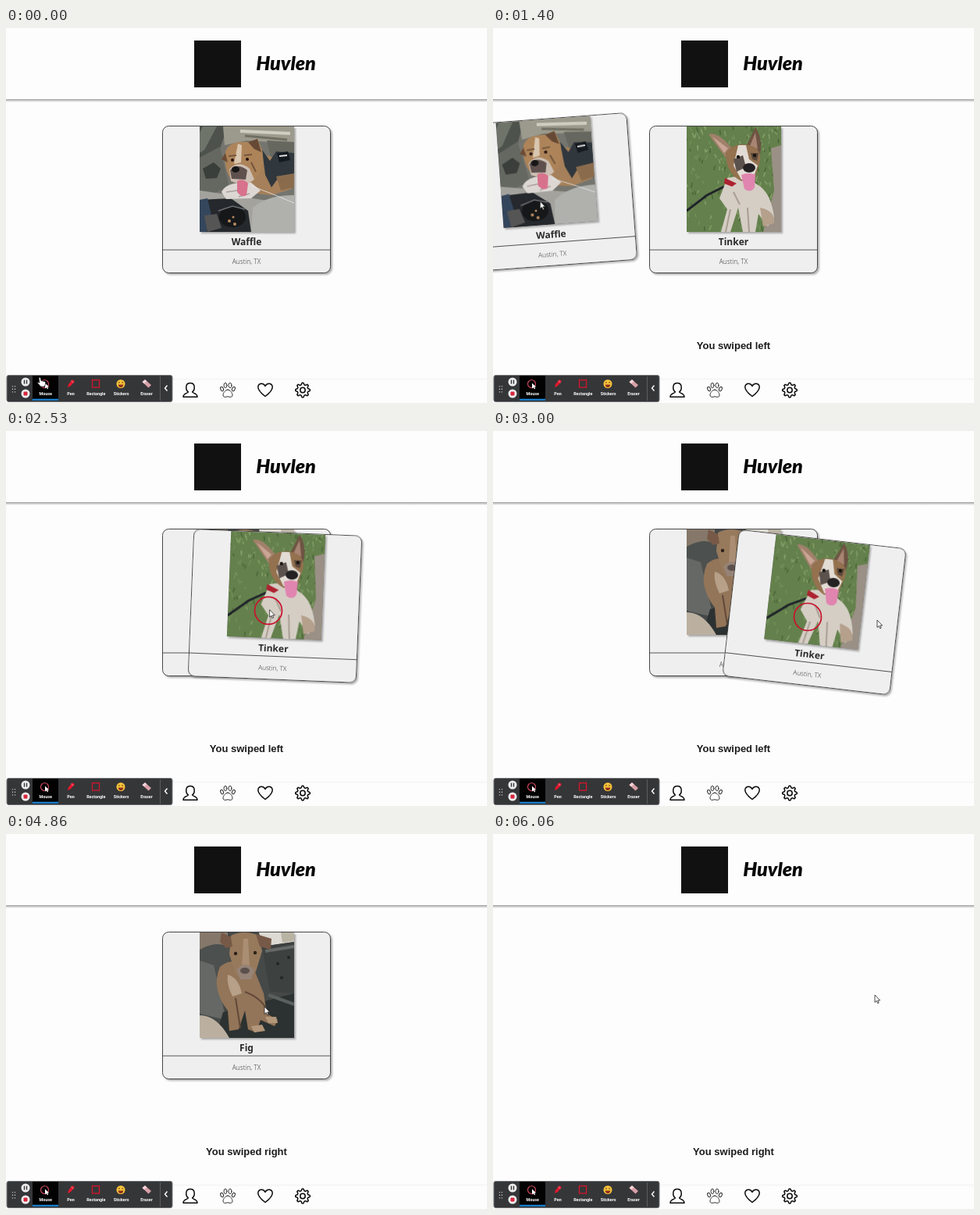
Recreate the animation shown at these times as an HTML page. Size 616x480 px, loop 6.13 s.

```html
<!DOCTYPE html>
<html lang="en">
<head>
<meta charset="utf-8">
<title>Pet cards</title>
<style>
  html, body { margin: 0; width: 100%; height: 100%; overflow: hidden; background: #fdfdfd; }
  svg { display: block; width: 100%; height: 100%; }
  text { text-anchor: middle; }
  .brand { font: italic 900 25px Lato, sans-serif; fill: #080808; }
  .name { font: 600 12px "Noto Sans", "Open Sans", sans-serif; fill: #2a2a2a; }
  .place { font: 300 8.4px "Open Sans", sans-serif; fill: #333; }
  .note { font: bold 13px "Liberation Sans", Arial, sans-serif; fill: #1c1c1c; }
  .tool { font: bold 5.4px Roboto, sans-serif; fill: #fff; }
  .line { fill: none; stroke: #0a0a0a; stroke-width: 1.5; stroke-linejoin: round; stroke-linecap: round; }
  .thin { stroke: #333; stroke-width: 1; }
</style>
</head>
<body>
<svg viewBox="0 0 616 480" preserveAspectRatio="none">
  <defs>
    <filter id="shade" x="-10%" y="-10%" width="125%" height="125%">
      <feDropShadow dx="2" dy="2" stdDeviation="1.2" flood-opacity=".3"/>
    </filter>
    <filter id="soft" x="-10%" y="-10%" width="120%" height="120%">
      <feGaussianBlur stdDeviation=".5"/>
    </filter>
    <linearGradient id="fall" x2="0" y2="1">
      <stop offset="0" stop-color="#a2a2a2"/>
      <stop offset=".4" stop-color="#c4c4c4"/>
      <stop offset="1" stop-color="#fdfdfd"/>
    </linearGradient>
    <clipPath id="frame"><rect width="121" height="135"/></clipPath>

    <g id="photo0">
      <rect width="121" height="135" fill="#75756f"/>
      <path d="M0 0H36L24 34 0 52Z" fill="#4d524c"/>
      <path d="M4 0H22L6 30 0 34V8Z" fill="#6f746b"/>
      <path d="M30 0H121V22L60 18 32 24Z" fill="#9c9a8c"/>
      <path d="M52 6 116 9" stroke="#d0cec2" stroke-width="4"/>
      <path d="M58 12 112 17" stroke="#706f63" stroke-width="3"/>
      <path d="M86 18 121 20V42H92Z" fill="#66675f"/>
      <path d="M0 40 26 26 38 78 0 92Z" fill="#656761"/>
      <path d="M4 54 18 46 27 54 22 66 8 67Z" fill="#3a3f3b"/>
      <path d="M0 82 121 100V135H0Z" fill="#a3a29d"/>
      <path d="M0 94 40 92 62 108 66 135H0Z" fill="#25282c"/>
      <path d="M0 94 10 92 18 126 8 135H0Z" fill="#34465c"/>
      <path d="M6 114 22 112 28 130 10 135Z" fill="#565555"/>
      <ellipse cx="42" cy="116" rx="17" ry="13" fill="#151719"/>
      <path d="M24 108 42 102 58 106" fill="none" stroke="#6b6e70" stroke-width="1.5"/>
      <g fill="#b78b62"><circle cx="38" cy="121" r="2"/><circle cx="45" cy="125" r="2"/><circle cx="43" cy="116" r="1.5"/></g>
      <path d="M68 104Q86 88 121 88V135H66Z" fill="#b0b0ad"/>
      <path d="M70 38Q100 32 114 60L118 80 92 88 58 84Z" fill="#a5805a"/>
      <path d="M28 84Q34 70 66 72L78 82 66 92 34 93Z" fill="#ddd7d4"/>
      <path d="M34 84 48 82M50 90 64 86" stroke="#a99f9a" stroke-width="1.5"/>
      <path d="M80 30 90 44 98 32 121 34V62L102 64 92 78 84 62Z" fill="#30373d"/>
      <path d="M98 64 121 60V78L104 82Z" fill="#8a6c4d"/>
      <path d="M99 34 113 32 116 43 102 46Z" fill="#151a20"/>
      <path d="M102 38 112 37" stroke="#ddd" stroke-width="2"/>
      <path d="M33 32Q38 18 62 20L74 16 80 30Q85 58 66 72H44Q30 58 33 32Z" fill="#ad8459"/>
      <path d="M62 20 74 16 79 33 70 29Z" fill="#664935"/>
      <path d="M33 34 28 42 36 46Z" fill="#6c4b35"/>
      <path d="M49 22 54 24 53 46 44 48Z" fill="#d9c6b0"/>
      <path d="M37 38 47 37M57 37 67 36M66 46 72 58" stroke="#74563d" stroke-width="2"/>
      <path d="M38 55Q49 42 64 54L70 68 58 76 40 70Z" fill="#cdbfb3"/>
      <path d="M39 56Q48 46 61 56L59 68 41 67Z" fill="#5e514d"/>
      <ellipse cx="46" cy="55" rx="5" ry="4" fill="#171717"/>
      <circle cx="42" cy="43" r="2" fill="#211"/><circle cx="61" cy="42" r="2" fill="#211"/>
      <path d="M48 70Q56 66 62 73L60 88Q54 92 48 84Z" fill="#d8718c"/>
      <path d="M66 76 92 86 121 98" fill="none" stroke="#e9e9e9" stroke-width=".8"/>
    </g>

    <g id="photo1">
      <rect width="121" height="135" fill="#64804c"/>
      <g id="grass"/>
      <path d="M108 28 121 24V135H98L112 82Z" fill="#9a9085"/>
      <path d="M0 108 26 88 48 77" fill="none" stroke="#20242a" stroke-width="3"/>
      <path d="M52 66Q74 60 90 74 108 84 112 116L104 128 92 112 88 135H72L66 104 56 135H44L52 106 42 92Z" fill="#d5cec5"/>
      <path d="M94 104Q114 108 112 124L98 128Z" fill="#b5a08c"/>
      <path d="M56 106 50 135M78 104 80 135M60 84 68 100" stroke="#a99e92" stroke-width="2"/>
      <path d="M50 40 28 10Q40 6 58 28Z" fill="#a0806a"/>
      <path d="M48 34 33 13 53 28Z" fill="#caa595"/>
      <path d="M76 26 88 1Q98 16 94 36Z" fill="#6d5443"/>
      <path d="M81 25 88 8 91 29Z" fill="#a88473"/>
      <path d="M50 34Q60 20 80 24 96 28 94 44L88 64 70 70Q50 60 50 34Z" fill="#94714f"/>
      <path d="M66 24 76 24 80 42 91 50 86 64 70 68 60 50Z" fill="#e2dcd4"/>
      <path d="M60 42 72 37 76 52 64 58Z" fill="#5c524d"/>
      <path d="M82 34 92 34 90 44 84 42Z" fill="#5a483a"/>
      <circle cx="66" cy="39" r="2.2" fill="#17130f"/><circle cx="87" cy="37" r="2.2" fill="#17130f"/>
      <ellipse cx="80" cy="53" rx="8" ry="6" fill="#242122"/>
      <path d="M70 62Q80 58 88 62L87 78Q82 86 74 80Z" fill="#e085af"/>
      <path d="M49 66 64 73 58 77 48 73Z" fill="#ad2230"/>
    </g>

    <g id="photo2">
      <rect width="121" height="135" fill="#454948"/>
      <path d="M0 0H36V14L0 24Z" fill="#85786a"/>
      <path d="M76 0H121V12L80 18Z" fill="#dcdad2"/>
      <path d="M104 0H121V11L106 13Z" fill="#b9b3a4"/>
      <path d="M0 22Q26 8 40 22L34 92 0 100Z" fill="#4c504e"/>
      <path d="M80 18 121 12V78L90 76Z" fill="#3d4140"/>
      <path d="M84 24 121 18" stroke="#656967" stroke-width="4"/>
      <g fill="#222625"><circle cx="100" cy="40" r="2"/><circle cx="114" cy="32" r="2"/><circle cx="105" cy="58" r="2"/></g>
      <path d="M0 36 18 42 34 112 0 104Z" fill="#656865"/>
      <path d="M30 102 121 78V135H20Z" fill="#2c3231"/>
      <path d="M88 80 121 92" stroke="#59605d" stroke-width="4"/>
      <path d="M0 106Q22 106 38 135H0Z" fill="#bbb0a0"/>
      <path d="M26 44Q44 28 70 48L82 78 86 104 100 112 96 120 78 112 72 128 62 124 58 100 50 124 38 126 36 100Q14 72 26 44Z" fill="#937559"/>
      <path d="M36 54Q50 58 54 78L42 82Q34 66 36 54Z" fill="#b7a088"/>
      <path d="M58 76Q84 86 88 106M46 84 52 122" fill="none" stroke="#62493a" stroke-width="2"/>
      <path d="M66 120 80 118 84 126 70 128ZM84 108 98 108 100 116 88 116Z" fill="#b3977a"/>
      <path d="M40 4Q56-4 76 4L80 24 72 50Q60 64 46 54L38 28Z" fill="#97795c"/>
      <path d="M40 6 28 0 26 12 34 20 42 18Z" fill="#775947"/>
      <path d="M72 2 92 8 91 22 77 18Z" fill="#775947"/>
      <path d="M56 8 62 8 64 44 54 44Z" fill="#aa8e73"/>
      <path d="M47 48Q58 34 70 48L66 60H52Z" fill="#958377"/>
      <ellipse cx="58" cy="49" rx="6" ry="4" fill="#5c504c"/>
      <circle cx="46" cy="27" r="2.2" fill="#2d2218"/><circle cx="71" cy="26" r="2.2" fill="#2d2218"/>
    </g>
  </defs>

  <rect width="616" height="480" fill="#fdfdfd"/>
  <rect y="91" width="616" height="4" fill="url(#fall)"/>
  <rect x="241" y="16" width="60" height="60" fill="#111"/>
  <text class="brand" x="358.5" y="54">Huvlen</text>
  <path d="M0 449.5H616" stroke="#f6f6f6" stroke-width="2"/>

  <g id="cards"></g>
  <text id="note" class="note" x="308" y="411"></text>

  <g class="line">
    <path d="M236 454.5c-7 0-6 9-2.6 11.3-.4 1.8-6.6 1.6-6.4 6.4h18c.2-4.8-6-4.6-6.4-6.4 3.4-2.3 4.4-11.3-2.6-11.3Z"/>
    <g class="thin">
      <path d="M284 463c-3 0-6 4-6 7 0 3 3.5 2.5 6 1.7 2.5.8 6 1.3 6-1.7 0-3-3-7-6-7Z"/>
      <ellipse cx="281" cy="457.4" rx="2" ry="3.2"/><ellipse cx="287" cy="457.4" rx="2" ry="3.2"/>
      <ellipse cx="276.6" cy="462" rx="1.8" ry="2.8" transform="rotate(-25 276.6 462)"/>
      <ellipse cx="291.4" cy="462" rx="1.8" ry="2.8" transform="rotate(25 291.4 462)"/>
    </g>
    <path d="M332 471.5C326 467 322.8 463.5 322.8 459.8c0-5.4 7-6.3 9.2-1.4 2.2-4.9 9.2-4 9.2 1.4 0 3.7-3.2 7.2-9.2 11.7Z"/>
    <path id="gear"/>
    <circle cx="380" cy="463.5" r="3.2"/>
  </g>

  <g id="bar">
    <rect x="1" y="444.5" width="212" height="34" rx="2.5" fill="#353638" stroke="#77787a"/>
    <rect x="34" y="445" width="33" height="32" fill="#020202"/>
    <rect x="34" y="474.7" width="33" height="2" fill="#1a8fe8"/>
    <path d="M8.5 458v9M11.5 458v9" stroke="#bbb" stroke-width="1.3" stroke-dasharray="1.3 2.3"/>
    <circle cx="25" cy="453" r="5.5" fill="#eee"/>
    <path d="M23.5 450.5v5M26.5 450.5v5" stroke="#333" stroke-width="1.4"/>
    <circle cx="25" cy="468" r="5.5" fill="#eee"/>
    <rect x="22.5" y="465.5" width="5" height="5" rx="1" fill="#d8273c"/>
    <circle cx="49.5" cy="455.5" r="5" fill="none" stroke="#c8485b" stroke-width="1.2"/>
    <path d="M50 454.5v7l1.8-1.6 1.2 2.4 1.2-.6-1.2-2.3h2.2Z" fill="#fff"/>
    <path d="M79 460 80 456 85 450 88 452 83 458Z" fill="#e3182f"/>
    <path d="M83.5 451.5 86.5 454" stroke="#ff8b96"/>
    <rect x="110.5" y="450.5" width="9" height="9.5" fill="none" stroke="#d5152b" stroke-width="1.3"/>
    <circle cx="147" cy="455.5" r="5.5" fill="#f6c33b"/>
    <path d="M143.6 456.5h6.8q-.8 3.500-3.400 3.500t-3.400-3.500Z" fill="#8b2d1c"/>
    <path d="M143.8 454.2q1.1-1.4 2.2 0M148 454.2q1.1-1.4 2.2 0" fill="none" stroke="#58320c" stroke-width=".9"/>
    <path d="M174.5 453 178 450 186 457 182.5 460.5Z" fill="#d9a0a8"/>
    <path d="M174.5 453 178 450 180.5 452.2 177 455.3Z" fill="#f2d5d8"/>
    <path d="M197.5 446v31" stroke="#66676a" stroke-width=".8"/>
    <path d="M206.5 457.5 203.5 461 206.5 464.5" fill="none" stroke="#fff" stroke-width="1.4"/>
  </g>

  <circle id="ring" r="17.5" fill="none" stroke="#c9122d" stroke-width="1.7"/>
  <g id="mouse" fill="#fff" stroke="#222" stroke-width=".8" stroke-linejoin="round">
    <path id="arrow" d="M0 0V9.5L2.2 7.5 3.7 10.8 5.2 10.1 3.7 7H6.7Z"/>
    <path id="hand" d="M-1 1Q0-1 1.2 1L2 4.5 6.5 5.5Q8 6 7.5 8.5L6.5 12H1.5L-2.5 7.5Q-2.5 6 0 7Z"/>
  </g>
</svg>

<script>
const LOOP = 6130, TICK = 1000 / 15;
const $ = id => document.getElementById(id);

// each key: time, dx, dy, angle; grab is where the pointer holds the card
const pets = [
  { name: "Waffle", shown: 0, drop: 1400, grab: [286, 228.5],
    keys: [[700, 0, 0, 0], [1066, -113, -7.5, -2.1], [1733, -362, -11, -6.4], [1933, -440, -12, -7.8]] },
  { name: "Tinker", shown: 700, drop: 3060, grab: [299.5, 225.5],
    keys: [[2300, 0, 0, 0], [2933, 99, 12, 6.3], [3000, 103.5, 12.5, 6.6], [3467, 445, 30, 11]] },
  { name: "Fig", shown: 2300, drop: 5420, grab: [332, 222],
    keys: [[4900, 0, 0, 0], [5200, 90, 3, 2], [5467, 240, 0, 5], [5733, 445, -6, 8]] }
];

const pointer = [
  [0, 43, 447], [130, 58, 433], [330, 170, 325], [530, 265, 240], [667, 281, 228], [700, 281, 228],
  [1066, 168, 220], [1333, 62, 222], [1733, 52, 221], [2000, 300, 224], [2300, 300, 224],
  [2933, 402, 237], [3000, 492, 242], [3200, 640, 246], [3680, 640, 240], [3733, 566, 237],
  [4200, 331, 221], [4900, 331, 221], [5200, 422, 224], [5467, 560, 217], [5733, 585, 214],
  [5880, 585, 214], [6066, 489, 206]
];

function at(keys, t) {
  const last = keys[keys.length - 1];
  if (t <= keys[0][0]) return keys[0].slice(1);
  if (t >= last[0]) return last.slice(1);
  const i = keys.findIndex(k => k[0] > t), a = keys[i - 1], b = keys[i];
  const u = (t - a[0]) / (b[0] - a[0]);
  return a.slice(1).map((v, j) => v + (b[j + 1] - v) * u);
}

function drawCard(pet, i) {
  return `<g id="card${i}">
    <rect x="200.5" y="125.5" width="215" height="188" rx="8" fill="#efefef" stroke="#333" stroke-width=".9" filter="url(#shade)"/>
    <rect x="248" y="126" width="121" height="135" fill="#777" filter="url(#shade)"/>
    <g transform="translate(248 126)" clip-path="url(#frame)"><use href="#photo${i}" filter="url(#soft)"/></g>
    <path d="M200.5 284H415.5" stroke="#444" stroke-width=".9"/>
    <text class="name" x="308" y="278">${pet.name}</text>
    <text class="place" x="308" y="302">Austin, TX</text></g>`;
}

function drawGear() {
  const points = [];
  for (let i = 0; i < 32; i++) {
    const a = (i - 0.5) * Math.PI / 16, r = i % 4 < 2 ? 9.3 : 7;
    points.push(`${380 + r * Math.cos(a)} ${463.5 + r * Math.sin(a)}`);
  }
  $("gear").setAttribute("d", `M${points.join("L")}Z`);
}

function drawGrass() {
  let seed = 7, out = "";
  const rnd = () => (seed = seed * 16807 % 2147483647) / 2147483647;
  for (let i = 0; i < 220; i++) {
    const color = ["#879f69", "#4a6638", "#71905a"][i % 3];
    out += `<path d="M${rnd() * 121} ${rnd() * 138}l${rnd() * 6 - 3} ${-3 - rnd() * 4}" stroke="${color}" stroke-width="1.5"/>`;
  }
  $("grass").innerHTML = out;
}

function show(el, on) { el.setAttribute("visibility", on ? "visible" : "hidden"); }
function move(el, x, y) { el.setAttribute("transform", `translate(${x} ${y})`); }

function render(time) {
  const t = Math.floor((time + 7) / TICK) * TICK;
  let held = null;
  pets.forEach((pet, i) => {
    const [x, y, turn] = at(pet.keys, t), card = $("card" + i);
    card.setAttribute("transform", `translate(${x} ${y}) rotate(${turn} 308 219.5)`);
    show(card, t >= pet.shown && t < pet.keys[3][0]);
    if (t >= pet.keys[0][0] && t < pet.drop) held = [pet.grab[0] + x, pet.grab[1] + y];
  });
  show($("ring"), held);
  if (held) move($("ring"), ...held);

  const [px, py] = at(pointer, t);
  move($("mouse"), px, py);
  show($("hand"), py > 440);
  show($("arrow"), py <= 440);
  $("note").textContent = t < 1400 ? "" : t < 3060 ? "You swiped left" : "You swiped right";
}

$("cards").innerHTML = pets.map(drawCard).reverse().join("");
$("bar").insertAdjacentHTML("beforeend", ["Mouse", "Pen", "Rectangle", "Stickers", "Eraser"]
  .map((label, i) => `<text class="tool" x="${50.7 + i * 32.3}" y="470">${label}</text>`).join(""));
drawGear();
drawGrass();

function loop() {
  render(performance.now() % LOOP);
  requestAnimationFrame(loop);
}
loop();
</script>
</body>
</html>
```
